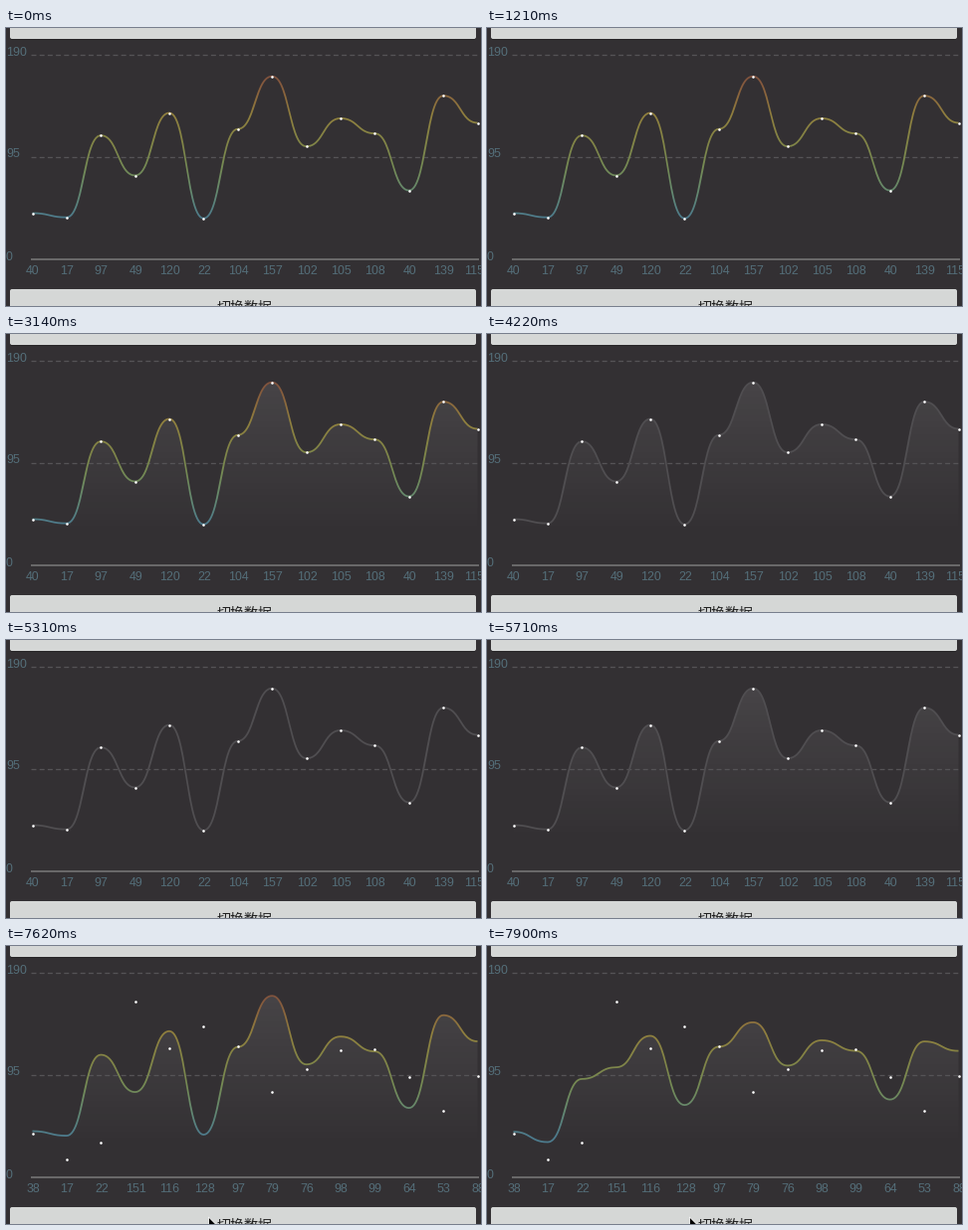
A matplotlib script for the animation above (8000 ms loop, 477 by 280 pixels).

```python
import numpy as np
import matplotlib.pyplot as plt
from matplotlib.animation import FuncAnimation
from matplotlib.colors import LinearSegmentedColormap
from matplotlib.patches import FancyBboxPatch, Polygon
from matplotlib.path import Path

W, H, DPI = 477, 280, 64
PX = 72 / DPI                      # points per pixel
LOOP, STEP = 8000, 20

BG, TEXT, BUTTON, GREY = "#333033", "#546e79", "#d5d7d6", "#504e51"
FILL_BOTTOM = 193

X = np.linspace(26.5, 473.5, 14)
OLD_Y = np.array([186.5, 190.7, 108.2, 148.5, 85.5, 191.7, 101.7,
                  48.7, 119.2, 91, 106.2, 163.6, 68.2, 95.5])
NEW_Y = np.array([188.5, 214.5, 198.2, 56.3, 103, 81.2, 100.7,
                  147.3, 123.6, 105, 104, 132.2, 166, 131])
OLD_LABELS = "40 17 97 49 120 22 104 157 102 105 108 40 139 115".split()
NEW_LABELS = "38 17 22 151 116 128 97 79 76 98 99 64 53 88".split()

COLOUR_SWITCHES = (500, 1210, 1770, 2200, 4220, 6670)
FILL_SWITCHES = (3140, 5310, 5710)
MORPH_TIMES = (7620, 7750, 7900)
MORPH_START, MORPH_LENGTH = 7541, 1000


def toggled(t, switches):
    return sum(t >= s for s in switches) % 2 == 1


def curve(ys, n=28):
    """Cubic spans with flat tangents at every data point."""
    u = np.linspace(0, 1, n, endpoint=False)
    sx = 1.5 * u * (1 - u) ** 2 + 1.5 * u ** 2 * (1 - u) + u ** 3
    sy = 3 * u ** 2 - 2 * u ** 3
    cx = X[:-1, None] + np.diff(X)[:, None] * sx
    cy = ys[:-1, None] + np.diff(ys)[:, None] * sy
    return np.append(cx, X[-1]), np.append(cy, ys[-1])


def stroke_path(cx, cy, width=1.8):
    dx, dy = np.gradient(cx), np.gradient(cy)
    size = np.hypot(dx, dy)
    off = np.column_stack([-dy / size, dx / size]) * width / 2
    mid = np.column_stack([cx, cy])
    return Path(np.vstack([mid + off, (mid - off)[::-1], mid[:1] + off[:1]]))


def area_path(cx, cy):
    pts = np.column_stack([cx, cy])
    base = [[cx[-1], FILL_BOTTOM], [cx[0], FILL_BOTTOM], pts[0]]
    return Path(np.vstack([pts, base]))


def value_at(t):
    """Share of the way from the old data to the new, held between steps."""
    past = [m for m in MORPH_TIMES if m <= t]
    if not past:
        return 0.0
    return (1 - np.cos(np.pi * (past[-1] - MORPH_START) / MORPH_LENGTH)) / 2


fig = plt.figure(figsize=(W / DPI, H / DPI), dpi=DPI, facecolor=BG)
ax = fig.add_axes([0, 0, 1, 1])
ax.axis("off")

rows = np.arange(H) + 0.5
ramp = LinearSegmentedColormap.from_list("ramp", [
    (0.0, "#80523f"), (0.12, "#8b643d"), (0.28, "#90803f"),
    (0.45, "#838446"), (0.65, "#748a55"), (0.82, "#648870"),
    (1.0, "#4d7b8d")])
COLOURED = ramp(np.clip((rows - 48) / 144, 0, 1))[:, None, :]
PLAIN = LinearSegmentedColormap.from_list("plain", [GREY, GREY])(rows * 0)[:, None, :]
shade = np.ones((H, 1, 4))
shade[:, 0, 3] = np.interp(rows, [48, FILL_BOTTOM], [0.1, 0.008])


def layer(data, z):
    return ax.imshow(data, extent=(0, W, H, 0), aspect="auto",
                     interpolation="nearest", zorder=z)


area = layer(shade, 1)
line = layer(COLOURED, 3)
ax.set_xlim(0, W)
ax.set_ylim(H, 0)


def label(x, y, s, ha="center"):
    return ax.text(x, y, s, ha=ha, va="baseline", color=TEXT, zorder=4,
                   family="Liberation Sans", size=12.4 * PX)


def button(y, h):
    for dy, colour in ((1.2, "#282628"), (0, BUTTON)):
        ax.add_patch(FancyBboxPatch(
            (6, y + 2 + dy), W - 13, h - 4, lw=0, fc=colour, zorder=5,
            boxstyle="round,pad=2,rounding_size=2"))


button(-30, 41)
button(263, 40)
ax.text(240, 280, "切换数据", ha="center", va="center_baseline", color="#222222",
        family="Noto Sans CJK JP", size=14 * PX, zorder=6)

for y, s in ((27, "190"), (130, "95"), (233, "0")):
    label(0, y + 0.5, s, "left")
    if y < 233:
        ax.plot([25, 475], [y, y], color="#555356", lw=1.3 * PX, zorder=2,
                dashes=(5 / 1.3, 3.2 / 1.3), dash_capstyle="butt")
ax.plot([25, 475], [233, 233], color="#7c7b7c", lw=1.5 * PX, zorder=2,
        solid_capstyle="butt")

# the last label is pushed left to stay inside the chart
ticks = [label(x + 0.5, 248.5, s) for x, s in zip(X[:-1], OLD_LABELS)]
ticks.append(label(480.5, 248.5, OLD_LABELS[-1], "right"))

dots, = ax.plot(X, OLD_Y, "o", color="white", ms=2.6 * PX, mew=0, zorder=4)

ARROW = np.array([(0, 0), (0, 14), (3.2, 11), (5.4, 16), (7.6, 15),
                  (5.5, 10.2), (10, 10)])
cursor = ax.add_patch(Polygon(ARROW, fc="black", ec="white", lw=0.8 * PX,
                              zorder=7))


def draw(n):
    t = n * STEP + STEP / 2
    changed = t >= MORPH_TIMES[0]

    cx, cy = curve(OLD_Y + (NEW_Y - OLD_Y) * value_at(t))
    line.set_data(PLAIN if toggled(t, COLOUR_SWITCHES) else COLOURED)
    line.set_clip_path(stroke_path(cx, cy), ax.transData)
    area.set_clip_path(area_path(cx, cy), ax.transData)
    area.set_visible(toggled(t, FILL_SWITCHES))

    dots.set_ydata(NEW_Y if changed else OLD_Y)
    for tick, s in zip(ticks, NEW_LABELS if changed else OLD_LABELS):
        tick.set_text(s)

    cursor.set_visible(t >= 6950)
    cursor.set_xy(ARROW + ((203.5, 273) if t >= 7100 else (194.3, 277)))
    return [line, area, dots, cursor, *ticks]


anim = FuncAnimation(fig, draw, frames=LOOP // STEP, interval=STEP,
                     repeat=True, repeat_delay=0, blit=False)
plt.show()
```
